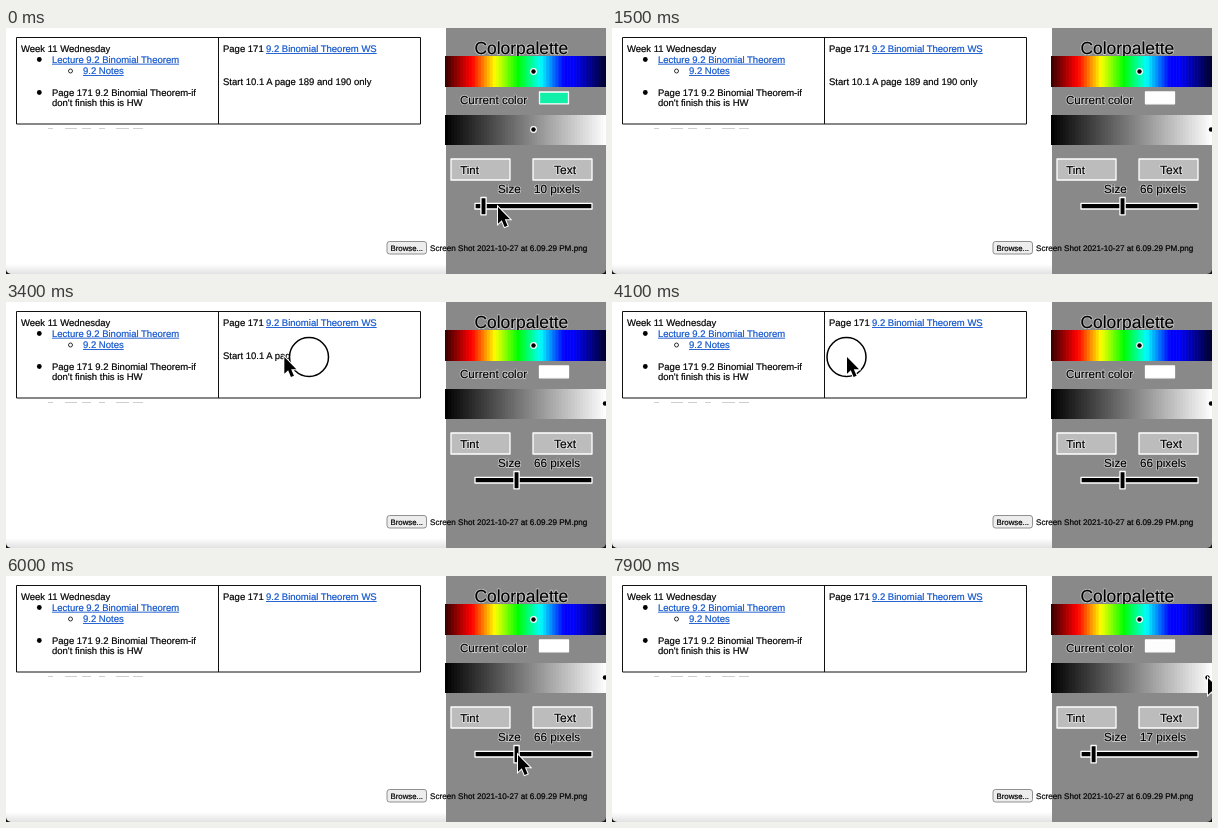
Recreate the animation shown at these times as an HTML page with a canvas. Size 600 by 246 pixels, loop 8000 ms.

```html
<!DOCTYPE html>
<html lang="en">
<head>
<meta charset="utf-8">
<title>Color palette</title>
<style>
html, body { margin: 0; width: 100%; height: 100%; overflow: hidden; background: #fff; }
canvas { display: block; width: 600px; height: 246px; }
</style>
</head>
<body>
<canvas id="stage"></canvas>
<script>
const W = 600, H = 246, LOOP = 8000, STEP = 100, LAG = 100;
const FONT = '"Liberation Sans", Arial, sans-serif';
const LINK = '#1155cc';
const PANEL = { x: 439, w: 161 };
const BRUSH = 19.5;
const ARROW = new Path2D('M0 0V16.8L3.8 13.3L6.6 20L9.6 18.7L6.8 12.2H12Z');

// Pointer moves, with rests between them
const HOME = { x: 492, y: 179 };
const MOVES = [
  { from: 0, to: 400, x: 512, y: 179 },
  { from: 600, to: 1400, x: 603, y: 102 },
  { from: 1700, to: 2500, x: 372, y: 55 },
  { from: 2900, to: 3700, x: 235, y: 55 },
  { from: 4930, to: 5900, x: 512, y: 179 },
  { from: 6200, to: 6800, x: 483, y: 179 },
  { from: 7100, to: 7800, x: 596, y: 102 }
];

const cv = document.getElementById('stage');
const dpr = window.devicePixelRatio || 1;
cv.width = W * dpr;
cv.height = H * dpr;
const c = cv.getContext('2d');
c.scale(dpr, dpr);
c.textRendering = 'geometricPrecision';

const clamp = k => Math.max(0, Math.min(1, k));
const mix = (a, b, k) => a + (b - a) * k;

function ease(t, from, to) {
  const k = clamp((t - from) / (to - from));
  return k * k * (3 - 2 * k);
}

function pointerAt(t) {
  let { x, y } = HOME;
  for (const m of MOVES) {
    const k = ease(t, m.from, m.to);
    x = mix(x, m.x, k);
    y = mix(y, m.y, k);
  }
  return { x, y };
}

function text(s, x, y, size, color = '#000') {
  c.font = size + 'px ' + FONT;
  c.fillStyle = c.strokeStyle = color;
  c.lineWidth = .2;
  c.strokeText(s, x, y);
  c.fillText(s, x, y);
}

function link(s, x, y) {
  text(s, x, y, 9.5, LINK);
  c.fillRect(x, y + 1, c.measureText(s).width, .9);
}

function haloText(s, x, y, size) {
  c.font = size + 'px ' + FONT;
  c.lineJoin = 'round';
  c.lineWidth = 1.8;
  c.strokeStyle = 'rgba(255,255,255,.55)';
  c.strokeText(s, x, y);
  text(s, x, y, size);
}

function box(x, y, w, h, fill, edge, line = 1) {
  c.fillStyle = fill;
  c.fillRect(x, y, w, h);
  c.strokeStyle = edge;
  c.lineWidth = line;
  c.strokeRect(x, y, w, h);
}

function disc(x, y, r, fill) {
  c.beginPath();
  c.arc(x, y, r, 0, Math.PI * 2);
  c.fillStyle = fill;
  c.fill();
}

function ring(x, y, r, line) {
  disc(x, y, r, '#fff');
  c.strokeStyle = '#000';
  c.lineWidth = line;
  c.stroke();
}

// Dark red, through the hues, to dark blue
function hueColor(k) {
  const hue = Math.min(240, Math.max(0, (k - .167) * 421));
  const light = 50 * Math.min(1, .2 + k * 5, .15 + (1 - k) * 4.2);
  return `hsl(${hue}, 100%, ${light}%)`;
}

function grayColor(k) {
  const v = Math.round(255 * clamp(k));
  return `rgb(${v},${v},${v})`;
}

function strip(y, h, color) {
  const n = 54, w = PANEL.w / n;
  for (let i = 0; i < n; i++) {
    c.fillStyle = color((i + .5) / n);
    c.fillRect(PANEL.x + i * w, y, w + .5, h);
  }
}

function marker(x, y) {
  disc(x, y, 3.4, '#fff');
  disc(x, y, 2.2, '#000');
}

function page() {
  c.fillStyle = '#fff';
  c.fillRect(0, 0, W, H);
  const shade = c.createLinearGradient(0, H - 10, 0, H);
  shade.addColorStop(0, '#fff');
  shade.addColorStop(1, '#e2e2e2');
  c.fillStyle = shade;
  c.fillRect(0, H - 10, W, 10);

  box(10.5, 9.5, 404, 86.5, '#fff', '#111');
  c.strokeRect(212.5, 9.5, 0, 86.5);

  text('Week 11 Wednesday', 15, 24, 9.5);
  link('Lecture 9.2 Binomial Theorem', 46, 34.7);
  link('9.2 Notes', 77, 46);
  text('Page 171 9.2 Binomial Theorem-if', 46, 67.5, 9.5);
  text("don't finish this is HW", 46, 78, 9.5);
  disc(33.3, 31.5, 2.4, '#000');
  disc(33.3, 64.5, 2.4, '#000');
  ring(64.5, 43, 2, .8);

  text('Page 171 ', 217, 24, 9.5);
  link('9.2 Binomial Theorem WS', 260, 24);
  text('Start 10.1 A page 189 and 190 only', 217, 57, 9.5);

  // clipped tops of the next line
  c.fillStyle = '#c4c4c4';
  for (let i = 0; i < 6; i++) c.fillRect(42 + i * 17, 100, 5 + i * 7 % 10, .8);
}

function erase(t) {
  if (t < 2600) return;
  const left = pointerAt(Math.min(t - LAG, 4900)).x;
  c.lineCap = 'round';
  c.lineWidth = BRUSH * 2;
  c.strokeStyle = '#fff';
  c.beginPath();
  c.moveTo(372, 55);
  c.lineTo(left - .01, 55);
  c.stroke();
  c.lineCap = 'butt';
}

function brush(t) {
  const p = pointerAt(t - LAG);
  if (p.x < 420) ring(p.x - .5, p.y, BRUSH, 1.5);
}

function sizeAt(t) {
  return Math.round(10 + 56 * ease(t, 0, 500) - 49 * ease(t, 6200, 6900));
}

function grayAt(t) {
  if (t < 1300) return 527.5;
  return t < 7800 ? 599 : 595.5;
}

function panel(t) {
  c.fillStyle = '#898989';
  c.fillRect(440, 0, 160, H);
  haloText('Colorpalette', 468.5, 26, 17.4);
  strip(28, 31, hueColor);
  marker(527.5, 43.5);

  const gx = grayAt(t);
  const swatch = t < 1300 ? '#10f0a8' : grayColor((gx - PANEL.x) / 158);
  haloText('Current color', 454, 76, 11.6);
  box(533.5, 64, 29, 11.8, swatch, '#fff', 1.3);
  strip(87, 30, grayColor);
  marker(gx, 101.5);

  box(445, 131, 59, 21, '#bcbcbc', '#fff', 1.3);
  box(527, 131, 59, 21, '#bcbcbc', '#fff', 1.3);
  haloText('Tint', 454.3, 146, 11.4);
  haloText('Text', 548, 146, 12);

  const n = sizeAt(t);
  haloText('Size', 492, 165, 11.7);
  haloText(n + ' pixels', 528, 165, 11.7);
  box(469, 175.3, 117, 5.7, '#000', '#fff', 1.3);
  box(469 + n * .59, 169.5, 5.2, 17.3, '#000', '#fff', 1.3);
}

function upload() {
  c.beginPath();
  c.roundRect(381, 213.5, 39.5, 12.5, 2.5);
  c.fillStyle = '#ededed';
  c.fill();
  c.lineWidth = .8;
  c.strokeStyle = '#777';
  c.stroke();
  text('Browse...', 384.5, 222.5, 7.8);
  text('Screen Shot 2021-10-27 at 6.09.29 PM.png', 424, 222.5, 8.15);
}

function pointer(p) {
  c.save();
  c.translate(p.x, p.y);
  c.lineJoin = 'miter';
  c.lineWidth = 2;
  c.strokeStyle = '#fff';
  c.stroke(ARROW);
  c.fillStyle = '#000';
  c.fill(ARROW);
  c.restore();
}

function corners() {
  c.beginPath();
  c.rect(0, 0, W, H);
  c.roundRect(0, -10, W, H + 10, 5);
  c.fillStyle = '#111';
  c.fill('evenodd');
}

function draw(t) {
  page();
  erase(t);
  brush(t);
  panel(t);
  upload();
  pointer(pointerAt(t));
  corners();
}

const start = performance.now();
function tick() {
  const t = (performance.now() - start) % LOOP;
  draw(Math.floor(t / STEP) * STEP);
  requestAnimationFrame(tick);
}
tick();
</script>
</body>
</html>
```
